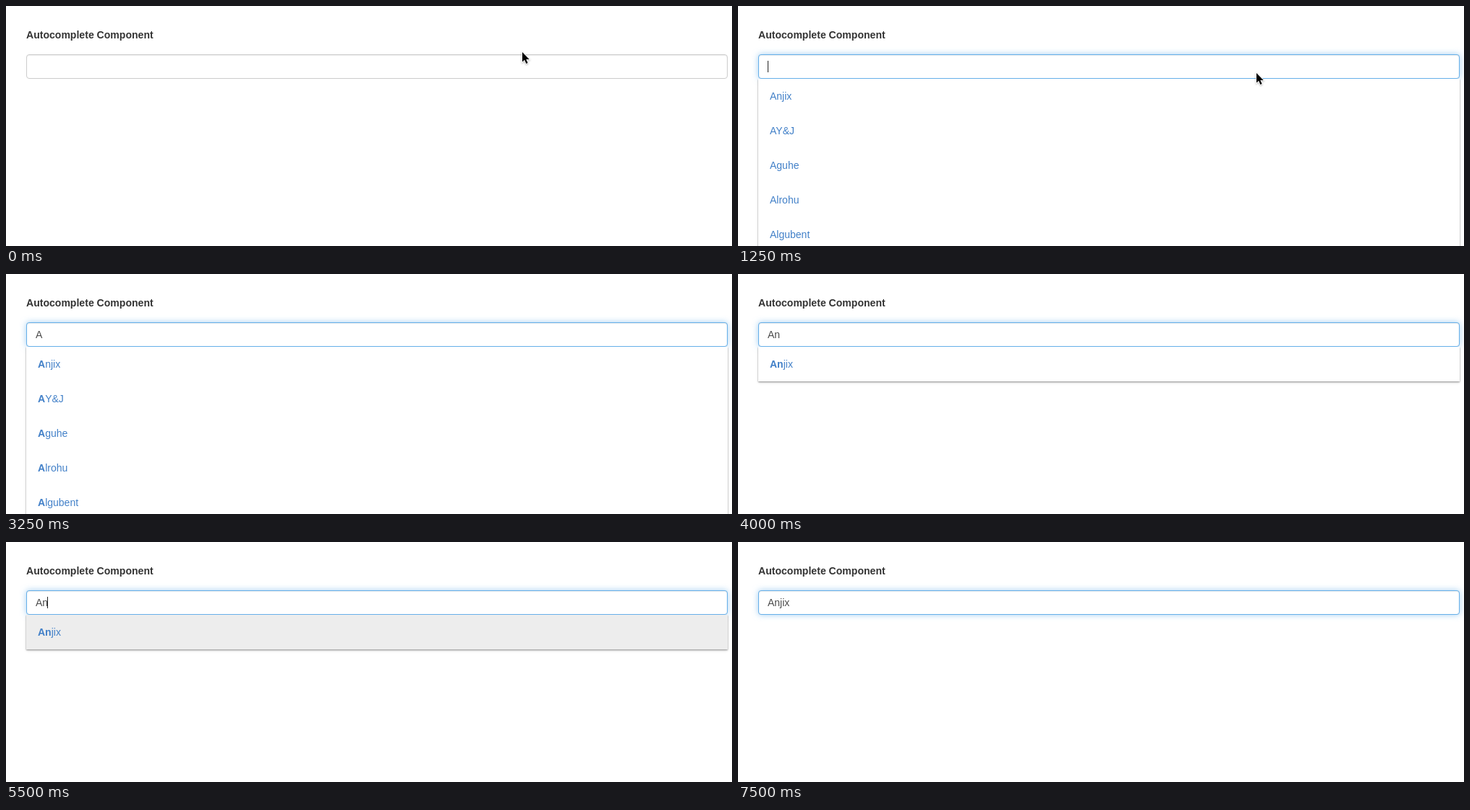
Recreate the animation shown at these times as an HTML page. Size 1004 by 333 pixels, loop 7.75 s.

```html
<!DOCTYPE html>
<html lang="en">
<head>
<meta charset="utf-8">
<title>Autocomplete</title>
<style>
html, body { margin: 0; width: 100%; height: 100%; overflow: hidden; background: #fff; }
body {
  position: relative;
  font: 14px/20px "Liberation Sans", Arial, sans-serif;
  color: #333;
}
label, .field, .text, .caret, .menu, .pointer { position: absolute; }

label { left: 28px; top: 30px; font-weight: bold; letter-spacing: .03px; white-space: nowrap; }

.field {
  left: 28px; top: 67px; width: 970px; height: 34px;
  box-sizing: border-box;
  border: 1px solid #ccc;
  border-radius: 4px;
  background: #fff;
  box-shadow: inset 0 1px 1px rgba(0, 0, 0, .075);
}
.focus {
  border-color: #66afe9;
  box-shadow: inset 0 1px 1px rgba(0, 0, 0, .075), 0 0 8px rgba(102, 175, 233, .6);
}
.text { left: 41px; top: 74px; color: #4c4c4c; }
.caret { left: 41px; top: 76px; width: 1px; height: 16px; background: #222; }

.menu {
  left: 28px; top: 101px; width: 970px;
  margin: 0; padding: 0;
  list-style: none;
  background: #fff;
  box-shadow: 0 1px 2px rgba(0, 0, 0, .4), 0 2px 4px rgba(0, 0, 0, .1);
  clip-path: inset(0 -8px -8px);
}
.menu li { padding: 14px 16px; color: #4280c8; }

.pointer { left: 712px; top: 62px; filter: drop-shadow(0 1px 1px rgba(0, 0, 0, .3)); }

/* One shared 7.75 s clock; every change is a hard step */
.focus, .text, .caret, .menu, .menu li, .pointer {
  animation-duration: 7.75s;
  animation-timing-function: step-end;
  animation-iteration-count: infinite;
}
.focus { animation-name: focus; }
.pointer { animation-name: move; }
.caret { animation-name: blink, advance; }
.all { animation-name: open; }
.one { animation-name: first; }
.two { animation-name: second; }
.done { animation-name: done; }
.pick { animation-name: pick; }

@keyframes focus { 0% { opacity: 0 } 16.129% { opacity: 1 } }
@keyframes open { 0% { opacity: 0 } 16.129% { opacity: 1 } 35.483% { opacity: 0 } }
@keyframes first { 0% { opacity: 0 } 35.483% { opacity: 1 } 45.161% { opacity: 0 } }
@keyframes second { 0% { opacity: 0 } 45.161% { opacity: 1 } 77.419% { opacity: 0 } }
@keyframes done { 0% { opacity: 0 } 77.419% { opacity: 1 } }
@keyframes pick { 0% { background: #fff } 58.064% { background: #ededed } }
@keyframes move {
  0% { transform: none; opacity: 1 }
  3.225% { transform: translate(3px, 29px) }
  35.483% { opacity: 0 }
}
@keyframes blink {
  0%, 22.58%, 41.935%, 51.612%, 64.516%, 83.87%, 96.774% { opacity: 0 }
  16.129%, 29.032%, 45.161%, 58.064%, 70.967%, 90.322% { opacity: 1 }
}
@keyframes advance {
  0% { left: 41px }
  35.483% { left: 50px }
  45.161% { left: 57px }
  77.419% { left: 71px }
}
</style>
</head>
<body>
<label>Autocomplete Component</label>
<div class="field"></div>
<div class="field focus"></div>

<ul class="menu all">
  <li>Anjix</li><li>AY&amp;J</li><li>Aguhe</li><li>Alrohu</li><li>Algubent</li>
</ul>
<ul class="menu one">
  <li><b>A</b>njix</li><li><b>A</b>Y&amp;J</li><li><b>A</b>guhe</li><li><b>A</b>lrohu</li><li><b>A</b>lgubent</li>
</ul>
<ul class="menu two">
  <li class="pick"><b>An</b>jix</li>
</ul>

<span class="text one">A</span>
<span class="text two">An</span>
<span class="text done">Anjix</span>
<div class="caret"></div>

<svg class="pointer" width="16" height="22" viewBox="-2 -2 16 22">
  <path d="M0 0V13.6L3.1 10.7L5.4 16L7.6 15.1L5.3 9.9H9.7Z" fill="#000" stroke="#fff" stroke-width="1.6" paint-order="stroke"/>
</svg>
</body>
</html>
```
